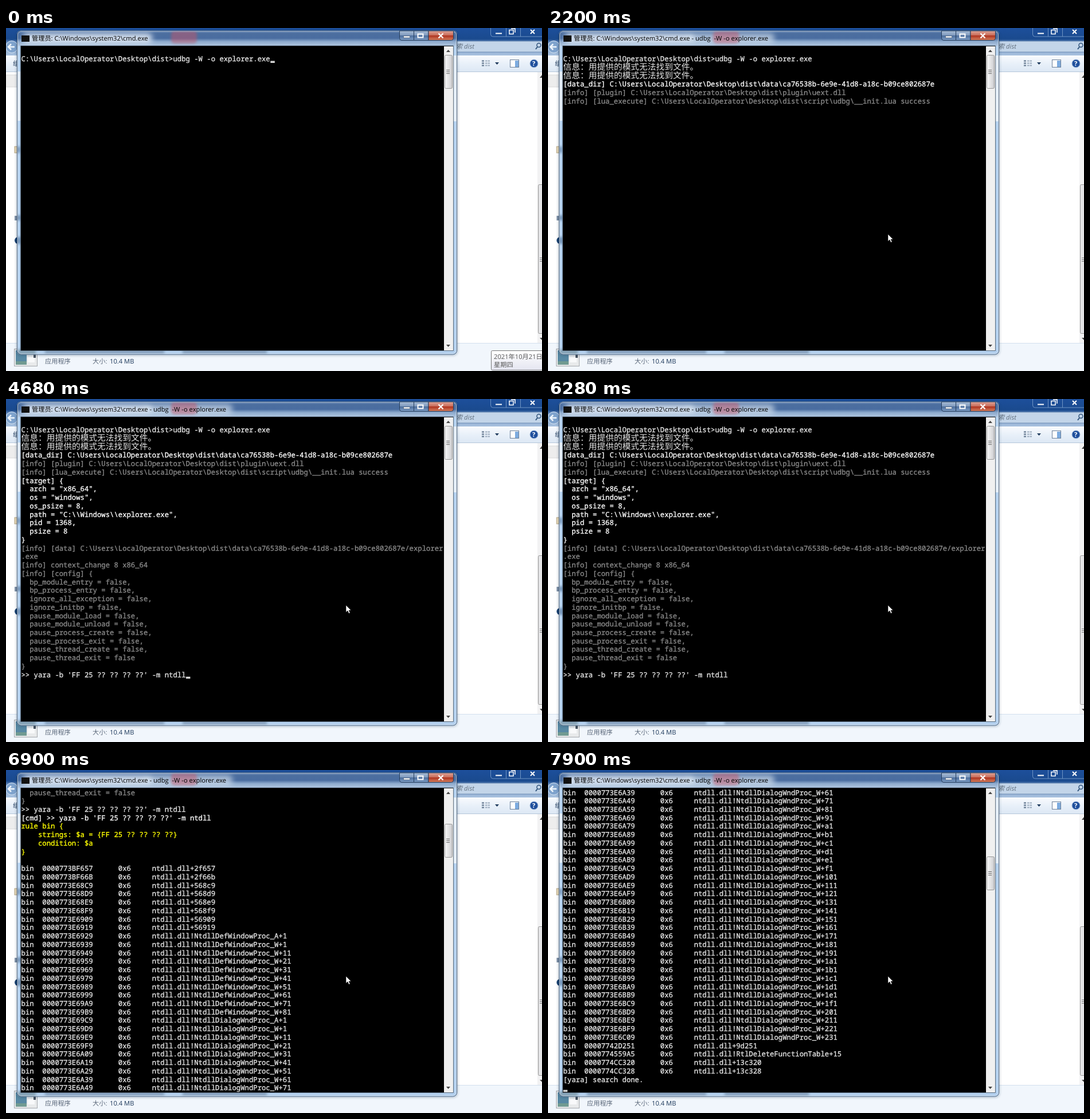
Animation, 935 px wide and 599 px high, one loop 8000 ms. Source, as an HTML page:

```html
<!DOCTYPE html>
<html lang="zh-CN">
<head>
<meta charset="utf-8">
<title>Console session</title>
<style>
html, body { margin: 0; width: 100%; height: 100%; overflow: hidden; background: #fff; }
svg { display: block; width: 935px; height: 599px; }
text { white-space: pre; text-rendering: geometricPrecision; }
.ui { font-family: "Open Sans", "Noto Sans CJK SC", sans-serif; font-size: 11.2px; }
#rows { font-family: "Noto Sans Mono", "DejaVu Sans Mono", monospace; font-size: 12.28px; stroke-width: .35px; }
#rows .wide { font-family: "Noto Sans CJK SC", sans-serif; font-size: 14.74px; font-weight: 300; stroke-width: 0; }
</style>
</head>
<body>
<svg viewBox="0 0 935 599">
  <defs>
    <linearGradient id="sky" x2="0" y2="1">
      <stop stop-color="#1d4f9b"/><stop offset=".4" stop-color="#1a4a8e"/>
      <stop offset=".55" stop-color="#6f93c2"/><stop offset="1" stop-color="#a9c2df"/>
    </linearGradient>
    <linearGradient id="bar" x2="0" y2="1">
      <stop stop-color="#f9fbfe"/><stop offset=".5" stop-color="#e8f0f9"/><stop offset="1" stop-color="#dce7f4"/>
    </linearGradient>
    <linearGradient id="glass" x2="0" y2="1">
      <stop stop-color="#7090bb"/><stop offset=".2" stop-color="#4c6e9f"/><stop offset=".5" stop-color="#4a6da0"/>
      <stop offset=".7" stop-color="#8daacd"/><stop offset="1" stop-color="#b4cae3"/>
    </linearGradient>
    <linearGradient id="button" x2="0" y2="1">
      <stop stop-color="#a9bdd6"/><stop offset=".48" stop-color="#7f9abd"/>
      <stop offset=".5" stop-color="#4d6e9c"/><stop offset="1" stop-color="#7d9dc5"/>
    </linearGradient>
    <linearGradient id="red" x2="0" y2="1">
      <stop stop-color="#dfa599"/><stop offset=".48" stop-color="#c86b58"/>
      <stop offset=".5" stop-color="#af3320"/><stop offset="1" stop-color="#d4805f"/>
    </linearGradient>
    <linearGradient id="thumb">
      <stop stop-color="#f6f6f6"/><stop offset=".5" stop-color="#e4e4e5"/><stop offset="1" stop-color="#cbcbce"/>
    </linearGradient>
    <linearGradient id="tip" x2="0" y2="1"><stop stop-color="#fff"/><stop offset="1" stop-color="#e4e5f0"/></linearGradient>
    <filter id="soft" x="-30%" y="-100%" width="160%" height="300%"><feGaussianBlur stdDeviation="5"/></filter>
    <filter id="smear" x="-30%" y="-100%" width="160%" height="300%"><feGaussianBlur stdDeviation="2"/></filter>
    <clipPath id="frame"><rect x="19" y="4.5" width="768" height="566" rx="7"/></clipPath>
    <clipPath id="console"><rect x="26" y="32" width="738" height="531"/></clipPath>
  </defs>

  <!-- file manager behind -->
  <rect width="935" height="599" fill="#fff"/>
  <rect width="935" height="48" fill="url(#sky)"/>
  <rect x="760" y="23" width="180" height="19" fill="#c3d5e9" stroke="#6c8cb3"/>
  <rect y="48" width="935" height="29" fill="url(#bar)"/>
  <path d="M0 76.500H935" stroke="#b6c6da"/>
  <g class="ui">
    <text x="785" y="36" font-style="italic" fill="#62707f">索 dist</text>
    <text x="12" y="66" fill="#1e395b">组</text>
  </g>
  <circle cx="929.500" cy="30" r="3.500" fill="none" stroke="#34577f" stroke-width="1.500"/>
  <path d="M927 33l-3 4" stroke="#34577f" stroke-width="2"/>
  <circle cx="10" cy="33" r="10.500" fill="#7fa3cd" stroke="#dce8f5"/>
  <path d="M15 33H5M9 28l-5 5 5 5" fill="none" stroke="#eef5fc" stroke-width="2.500"/>
  <path d="M845.500 0V11q0 4 4 4H935M872.500 0V15M897.500 0V15" fill="none" stroke="#6f94c4"/>
  <g fill="none" stroke="#fff" stroke-width="2">
    <path d="M854 9.500h11M915 3l7 7M922 3l-7 7"/>
    <path d="M878 3.500h7v7h-7zM881 1h7v7" stroke-width="1.500"/>
  </g>
  <path d="M830 57.500h4M830 61.500h4M830 65.500h4" stroke="#74869c" stroke-width="2.500"/>
  <path d="M836 57.500h8M836 61.500h8M836 65.500h8" stroke="#9aa9bb" stroke-width="2" stroke-dasharray="3.500 1"/>
  <path d="M853 60h7l-3.500 4z" fill="#1e395b"/>
  <rect x="879.500" y="55.500" width="15" height="13" fill="#fff" stroke="#6b7f98"/>
  <rect x="888" y="57" width="6" height="11" fill="#7cabdf"/>
  <circle cx="921" cy="62" r="7" fill="#1f4f9c" stroke="#9cb7da"/>
  <text x="918" y="66" class="ui" font-weight="bold" fill="#fff">?</text>
  <rect y="82" width="20" height="21" fill="#ededed" stroke="#d8d8d8"/>
  <rect x="15" y="207" width="8" height="11" fill="#eedcb8" stroke="#b5a683"/>
  <rect x="15" y="328" width="8" height="8" fill="#8393a8"/>
  <circle cx="21" cy="371" r="6" fill="#19406f"/>
  <rect x="927" y="77" width="8" height="473" fill="#f2f2f3"/>
  <rect x="928.500" y="273.500" width="12" height="260" rx="2" fill="#e4e4e6" stroke="#979797"/>
  <path d="M931 401.500h4M931 404.500h4M931 407.500h4" stroke="#777"/>
  <path d="M931 87l4-5v5zM931 541h4v4z" fill="#444"/>
  <rect y="550" width="935" height="49" fill="#f1f6fc"/>
  <path d="M0 550.500H935" stroke="#d3dfed"/>
  <rect x="14.500" y="560.500" width="40" height="30" fill="#e8eaeb" stroke="#a6a9ad"/>
  <rect x="17" y="563" width="19" height="25" fill="#5889a3"/>
  <path d="M17 582h19v6H17z" fill="#719b92"/>
  <path d="M38 575h12v9H38z" fill="#f8f9fa"/>
  <path d="M48 570h4v6h-4z" fill="#46525f"/>
  <g class="ui">
    <text x="68" y="586" fill="#5a6779">应用程序</text>
    <text x="151" y="586" fill="#5a6779">大小:</text>
    <text x="181" y="586" fill="#1e395b">10.4 MB</text>
  </g>
  <g id="clockTip" class="ui" fill="#575757">
    <rect x="846.500" y="563.500" width="95" height="34" rx="2" fill="url(#tip)" stroke="#767676"/>
    <text x="851" y="577.500">2021年10月21日</text>
    <text x="851" y="592">星期四</text>
  </g>

  <!-- console window -->
  <rect x="18" y="5" width="770" height="567" rx="8" fill="#16304f" opacity=".28" filter="url(#smear)"/>
  <g clip-path="url(#frame)">
    <rect x="19" y="4" width="768" height="567" fill="#b3d0ee"/>
    <rect x="780" y="48" width="7" height="115" fill="#e3edf7"/>
    <rect x="19" y="76" width="7" height="86" fill="#dfe9f3"/>
    <g filter="url(#smear)" opacity=".65">
      <path d="M19 207h5v11h-5zM19 327h6v9h-6zM19 365h6v12h-6z" fill="#315680"/>
      <path d="M68 562h208v7H68zM308 562h147v7H308z" fill="#6b84a0"/>
      <path d="M19 561h33v10H19z" fill="#6d8b99"/>
    </g>
    <rect x="19" y="4" width="768" height="28" fill="url(#glass)"/>
    <g filter="url(#soft)">
      <rect x="30" y="9" width="225" height="18" rx="8" fill="#e6eef7" opacity=".85"/>
      <rect id="glow" x="240" y="9" width="155" height="18" rx="8" fill="#dbe6f2" opacity=".65"/>
    </g>
    <rect x="288" y="5" width="45" height="22" rx="6" fill="#c2566a" opacity=".5" filter="url(#smear)"/>
  </g>
  <rect x="19.500" y="5" width="767" height="565" rx="7" fill="none" stroke="#263f5d" opacity=".8"/>
  <rect x="20.500" y="6" width="765" height="563" rx="6" fill="none" stroke="#fff" opacity=".5"/>
  <rect x="27" y="13" width="14" height="11" fill="#111"/>
  <text id="title" class="ui" x="45" y="22" fill="#000"></text>
  <g stroke="#243c5b">
    <path d="M686.500 5H711.500V21.500H690q-3.500 0-3.500-4z" fill="url(#button)"/>
    <path d="M711.500 5H737V21.500H711.500z" fill="url(#button)"/>
    <path d="M737 5H780.500V18q0 3.500-4 3.500H737z" fill="url(#red)"/>
  </g>
  <rect x="693.500" y="14" width="11" height="3" fill="#fff" stroke="#44546a" stroke-width=".6"/>
  <rect x="718.500" y="10.500" width="9" height="6" fill="none" stroke="#fff" stroke-width="2"/>
  <path d="M754.500 9.500l8 8M762.500 9.500l-8 8" stroke="#fff" stroke-width="2.300"/>
  <rect x="25.500" y="31" width="755" height="532.500" fill="#000" stroke="#55697f" stroke-opacity=".6"/>
  <rect x="764" y="32" width="16" height="531" fill="#f0f0f0"/>
  <path d="M768 42h7l-3.500-4zM768 553h7l-3.500 4z" fill="#444"/>
  <g id="scroll">
    <rect x="765.500" y="47.500" width="13" height="58" rx="2" fill="url(#thumb)" stroke="#979797"/>
    <path d="M768 73.500h6M768 76.500h6M768 79.500h6" stroke="#666"/>
  </g>
  <g clip-path="url(#console)">
    <g id="rows"></g>
    <rect id="caret" width="7.500" height="3.500" fill="#d4d4d4"/>
  </g>
  <path id="mouse" d="M0 0V12.500L3 9.800L5 14.500L7.200 13.500L5.200 9H9z" fill="#fff" stroke="#000" stroke-width=".6"/>
</svg>

<script>
const LOOP = 8000, COLS = 7.37, LINE = 14.74, LEFT = 26.5, TOP = 32, ROWS = 36;
const PLAIN = '#e6e6e6', WHITE = '#fff', GRAY = '#898989', YELLOW = '#ff0';
const $ = id => document.getElementById(id);

const home = 'C:\\Users\\LocalOperator\\Desktop\\dist';
const data = home + '\\data\\ca76538b-6e9e-41d8-a18c-b09ce802687e';
const search = "yara -b 'FF 25 ?? ?? ?? ??' -m ntdll";
const INPUT = 30;

const lines = [];
const add = (color, ...texts) => texts.forEach(text => lines.push({ text, color }));
const notFound = '信息：用提供的模式无法找到文件。';

add(PLAIN, '', home + '>udbg -W -o explorer.exe', notFound, notFound);
add(WHITE, '[data_dir] ' + data);
add(GRAY, `[info] [plugin] ${home}\\plugin\\uext.dll`,
  `[info] [lua_execute] ${home}\\script\\udbg\\__init.lua success`);
add(WHITE, '[target] {', '  arch = "x86_64",', '  os = "windows",', '  os_psize = 8,',
  '  path = "C:\\\\Windows\\\\explorer.exe",', '  pid = 1368,', '  psize = 8', '}');
add(GRAY, `[info] [data] ${data}/explorer`, '.exe', '[info] context_change 8 x86_64', '[info] [config] {');
const flags = ['bp_module_entry', 'bp_process_entry', 'ignore_all_exception', 'ignore_initbp',
  'pause_module_load', 'pause_module_unload', 'pause_process_create', 'pause_process_exit',
  'pause_thread_create', 'pause_thread_exit'];
add(GRAY, ...flags.map((f, i) => `  ${f} = false${i < flags.length - 1 ? ',' : ''}`), '}');
add(PLAIN, '');
add(WHITE, '[cmd] >> ' + search);
add(YELLOW, 'rule bin {', '    strings: $a = {FF 25 ?? ?? ?? ??}', '    condition: $a', '}');
add(PLAIN, '');

// Each match is an offset into the module, optionally relative to a symbol.
const BASE = 0x77390000;
function match(offset, symbol, start) {
  const address = (BASE + offset).toString(16).toUpperCase().padStart(12, '0');
  const place = symbol ? `!${symbol}+${(offset - start).toString(16)}` : '+' + offset.toString(16);
  add(PLAIN, `bin  ${address}      0x6     ntdll.dll${place}`);
}
function matches(from, to, symbol) {
  for (let o = from; o <= to; o += 16) match(o, symbol, from - 1);
}
match(0x2f657);
match(0x2f66b);
matches(0x568c9, 0x56919);
matches(0x56929, 0x56929, 'NtdllDefWindowProc_A');
matches(0x56939, 0x569b9, 'NtdllDefWindowProc_W');
matches(0x569c9, 0x569c9, 'NtdllDialogWndProc_A');
matches(0x569d9, 0x56c09, 'NtdllDialogWndProc_W');
match(0x9d251);
match(0xc59a5, 'RtlDeleteFunctionTable', 0xc5990);
match(0x13c320);
match(0x13c328);
add(PLAIN, '[yara] search done.', '');

// Timed states: [start, value...]
const lineCounts = [[0, 2], [2000, 3], [2070, 4], [2200, 7], [2670, 17], [2740, 31],
  [6620, 32], [6690, 39], [6760, 50], [6820, 57], [6890, 64], [6960, 72], [7030, 79],
  [7100, 86], [7170, 93], [7230, 98]];
const inputs = [[0, ''], [3810, '>>'], [4680, '>> ' + search]];
const pointer = [[0, -50, -50], [390, 832, 567], [460, 690, 450], [530, 589, 363], [800, 593, 360]];
// Caret: start, end, row, column
const carets = [[0, 460, 1, 59], [1000, 1530, 1, 59], [3610, 3810, 30, 0], [4140, 4220, 30, 3],
  [4680, 5210, 30, 39], [5750, 6280, 30, 39], [7900, LOOP, 35, 0]];
const at = (states, t) => states.findLast(s => s[0] <= t);

const rows = Array.from({ length: ROWS }, (_, i) => {
  const el = document.createElementNS('http://www.w3.org/2000/svg', 'text');
  el.setAttribute('x', LEFT);
  el.setAttribute('y', TOP + i * LINE + 11.5);
  return $('rows').appendChild(el);
});

function setText(el, text) {
  if (el.textContent !== text) el.textContent = text;
}

function render(t) {
  const count = at(lineCounts, t)[1];
  const offset = Math.max(0, count - ROWS);
  lines[INPUT].text = at(inputs, t)[1];
  rows.forEach((el, i) => {
    const line = offset + i < count ? lines[offset + i] : { text: '', color: PLAIN };
    setText(el, line.text);
    el.setAttribute('fill', line.color);
    el.setAttribute('stroke', line.color);
    el.setAttribute('class', line.text === notFound ? 'wide' : '');
  });
  $('scroll').setAttribute('transform', `translate(0 ${Math.round(offset * 1.67)})`);

  const caret = carets.find(c => t >= c[0] && t < c[1]);
  $('caret').setAttribute('visibility', caret ? 'visible' : 'hidden');
  if (caret) {
    $('caret').setAttribute('x', LEFT + caret[3] * COLS);
    $('caret').setAttribute('y', TOP + (caret[2] + 1) * LINE - 4);
  }

  const running = t >= 1800;
  setText($('title'), '管理员: C:\\Windows\\system32\\cmd.exe' + (running ? ' - udbg  -W -o explorer.exe' : ''));
  $('glow').setAttribute('visibility', running ? 'visible' : 'hidden');
  $('clockTip').setAttribute('visibility', t < 800 ? 'visible' : 'hidden');
  const [, x, y] = at(pointer, t);
  $('mouse').setAttribute('transform', `translate(${x} ${y})`);
}

const begin = performance.now();
function tick() {
  render((performance.now() - begin) % LOOP);
  requestAnimationFrame(tick);
}
tick();
</script>
</body>
</html>
```
